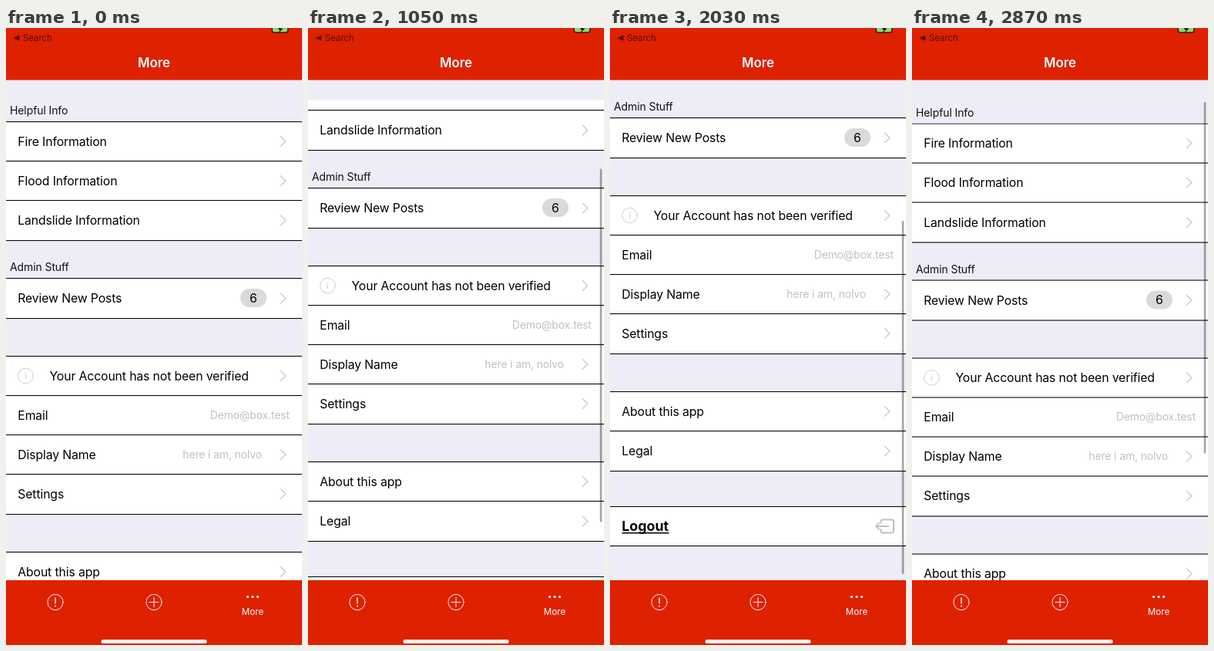
Recreate the animation shown at these times as an HTML page. Size 384 by 800 pixels, loop 2940 ms.

```html
<!DOCTYPE html>
<html lang="en">
<head>
<meta charset="utf-8">
<title>More</title>
<style>
  html, body { margin: 0; width: 100%; height: 100%; overflow: hidden; background: #eeecf6; }
  svg { display: block; width: 384px; height: 800px; }
  text { font-family: Inter, Roboto, sans-serif; font-size: 15.77px; letter-spacing: -.12px; }
  .head { font-size: 14px; letter-spacing: -.1px; fill: #111; }
  .value { font-size: 13.9px; letter-spacing: -.1px; fill: #c0c0c4; text-anchor: end; }
  .mid { text-anchor: middle; }
  .line { fill: none; stroke-linecap: round; stroke-linejoin: round; }
</style>
</head>
<body>
<svg viewBox="0 0 384 800">
  <rect width="384" height="800" fill="#eeecf6"/>
  <g id="list"></g>
  <rect id="sticky" y="44" width="384" height="49" fill="#eeecf6"/>
  <g id="heads"></g>
  <rect id="thumb" x="378.7" width="2.6" rx="1.3" fill="#000" fill-opacity=".36"/>

  <rect width="384" height="67.5" fill="#de2100"/>
  <path d="M9.5 13l8-3.7v7.4z" fill="#57100a"/>
  <text x="22" y="17" fill="#57100a" style="font-size:11.4px;letter-spacing:0">Search</text>
  <rect x="344.5" y="-8" width="22" height="14.5" rx="3" fill="#4b1a0c"/>
  <rect x="346" y="-8" width="19" height="13" rx="2" fill="#8ed873"/>
  <path d="M357.5-3l-5 5h3l-2 4.5 6-6h-3l3-3.5z" fill="#111"/>
  <text class="mid" x="192" y="51" fill="#fff" style="font-size:16.8px;font-weight:600;letter-spacing:0">More</text>

  <rect y="716" width="384" height="84" fill="#de2100"/>
  <g class="line" stroke="#fff" stroke-opacity=".92">
    <circle cx="64" cy="744.5" r="10.1"/>
    <path d="M64 739v7" stroke-width="1.5"/>
    <circle cx="192" cy="744.5" r="10.1"/>
    <path d="M186 744.5h12M192 738.5v12"/>
  </g>
  <g fill="#fff">
    <circle cx="64" cy="749.5" r="1"/>
    <circle cx="313.5" cy="737.5" r="1.6"/>
    <circle cx="320" cy="737.5" r="1.6"/>
    <circle cx="326.5" cy="737.5" r="1.6"/>
    <text class="mid" x="320" y="761" style="font-size:11.6px;letter-spacing:0">More</text>
    <rect x="123.5" y="793" width="137" height="5" rx="2.5"/>
  </g>
</svg>
<script>
const STEP = 70, LOOP = 2940;
const $ = id => document.getElementById(id);

function add(parent, tag, attrs, text) {
  const el = document.createElementNS('http://www.w3.org/2000/svg', tag);
  for (const key in attrs) el.setAttribute(key, attrs[key]);
  if (text) el.textContent = text;
  parent.appendChild(el);
  return el;
}

const list = $('list'), heads = $('heads');
const label = (x, cy, text, cls = '') =>
  add(list, 'text', { x, y: cy + 5.6, class: cls }, text);
const stroke = (d, color, width) =>
  add(list, 'path', { d, class: 'line', stroke: color, 'stroke-width': width });
const chevron = cy => stroke(`M356.3 ${cy - 6.3}l6.5 6.3l-6.5 6.3`, '#c3c3c7', 1.1);

// Row borders of each white section
const sections = [
  [121, 172, 223, 275], [324, 376], [425, 476, 527, 578, 630],
  [679, 730, 782], [828, 879]
];
for (const ys of sections) {
  const end = ys[ys.length - 1];
  add(list, 'rect', { y: ys[0], width: 384, height: end - ys[0], fill: '#fff' });
  for (const y of ys) add(list, 'rect', { y, width: 384, height: 1.1, fill: '#0a0a0a' });
}

add(heads, 'text', { x: 5, y: 112, class: 'head' }, 'Helpful Info');
add(heads, 'text', { x: 5, y: 315, class: 'head' }, 'Admin Stuff');

const rows = [
  ['Fire Information', 147], ['Flood Information', 198], ['Landslide Information', 249.5],
  ['Review New Posts', 350.5], ['Your Account has not been verified', 451, 56.5],
  ['Email', 502], ['Display Name', 553], ['Settings', 604],
  ['About this app', 705], ['Legal', 756.5]
];
for (const [text, cy, x = 15.3] of rows) {
  label(x, cy, text);
  if (text !== 'Email') chevron(cy);
}

add(list, 'rect', { x: 304, y: 338, width: 34, height: 24, rx: 12, fill: '#dad9dc' });
label(320.8, 350, '6', 'mid');

add(list, 'circle', { cx: 25.5, cy: 451, r: 9.8, class: 'line', stroke: '#cfcccf', 'stroke-width': 1 });
add(list, 'circle', { cx: 25.5, cy: 447.5, r: .8, fill: '#cfcccf' });
stroke('M25.5 450v4.5', '#cfcccf', 1);

add(list, 'text', { x: 368, y: 506.5, class: 'value' }, 'Demo@box.test');
add(list, 'text', { x: 332, y: 557.5, class: 'value' }, 'here i am, nolvo');

const logout = label(15.3, 854.4, 'Logout');
logout.style.cssText = 'font-size:17.8px;font-weight:700;letter-spacing:0';
add(list, 'rect', { x: 15.5, y: 862, width: 61, height: 1.5 });
stroke('M351.5 850v-2q0-2.5 2.5-2.5h11.5q2.5 0 2.5 2.5v12q0 2.5-2.5 2.5h-11.5q-2.5 0-2.5-2.5v-2', '#c0bfc4', 2);
stroke('M361 854h-16M349 850l-4 4l4 4', '#c0bfc4', 1.9);

// Finger drags, as [time, offset]
const drag = [
  [560, 0], [630, -4], [700, -14], [770, -30], [840, -49], [910, -70], [980, -93], [1050, -117]
];
const flick = [[2030, -208], [2100, -146], [2170, -66], [2230, 0]];

function follow(points, t) {
  const i = Math.max(1, points.findIndex(p => p[0] >= t));
  const [t0, a] = points[i - 1], [t1, b] = points[i];
  return a + (b - a) * (t - t0) / (t1 - t0);
}

function offsetAt(t) {
  if (t <= 560) return 0;
  if (t <= 1050) return follow(drag, t);
  if (t < 2030) return -211 + 94 * Math.exp((1050 - t) / 283);
  if (t <= 2230) return follow(flick, t);
  const s = (t - 2230) / 1000; // spring back after overscroll
  return 1099 * s * Math.exp(-8.8 * s);
}

function draw(now) {
  const t = Math.floor((now % LOOP) / STEP) * STEP;
  const off = Math.round(offsetAt(t) * 2) / 2;
  list.setAttribute('transform', `translate(0 ${off})`);
  heads.setAttribute('transform', `translate(0 ${off})`);

  // The pinned header is pushed out by the next one, border included
  const bottom = Math.min(Math.max(121 + off, 93), 277 + off);
  $('sticky').setAttribute('y', bottom - 49);

  const thumb = $('thumb');
  thumb.setAttribute('y', 96 - Math.min(0, off) * .74);
  thumb.setAttribute('height', 458 - Math.max(0, off));
  thumb.style.display = t > 560 ? '' : 'none';
}

const start = performance.now();
function tick() {
  draw(performance.now() - start);
  requestAnimationFrame(tick);
}
tick();
</script>
</body>
</html>
```
